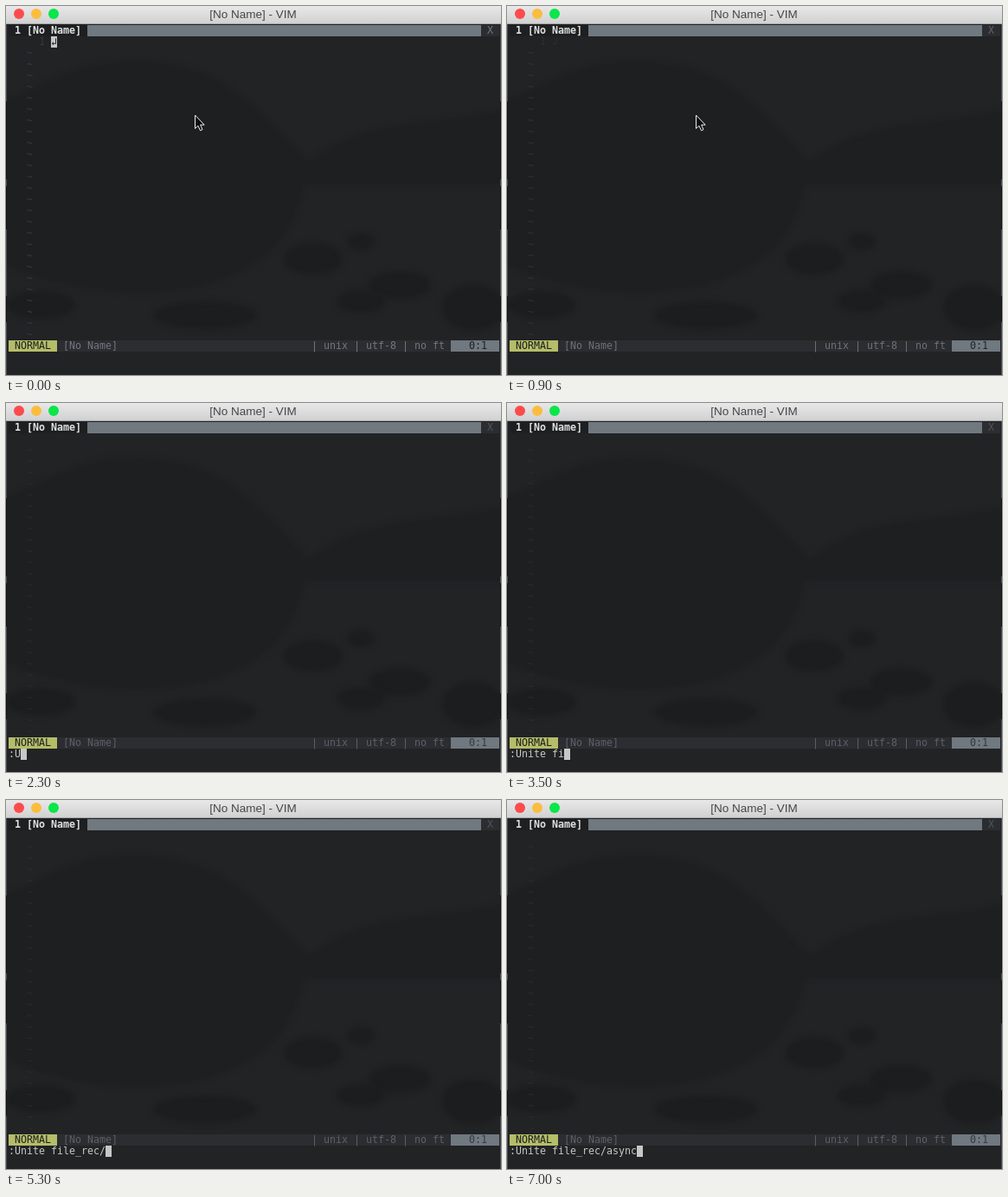
An HTML page with a canvas that plays this animation: 572 by 426 pixels, repeating every 8 s.

```html
<!DOCTYPE html>
<html lang="en">
<head>
<meta charset="utf-8">
<title>Vim command line</title>
<style>
  html, body { margin: 0; width: 100%; height: 100%; overflow: hidden; background: #1f2123; }
  canvas { display: block; }
</style>
</head>
<body>
<canvas id="stage" width="572" height="426"></canvas>
<script>
const W = 572, H = 426, LOOP = 8000;
const CELL = 7, ROW = 13, LEFT = 3, TOP = 22;
const MONO = '11.63px "DejaVu Sans Mono", monospace';
const GRAY = '#707880', LIGHT = '#c5c8c6', DARK = '#1d1f21', FAINT = '#373b41';

const command = 'Unite file_rec/async';
const keyTimes = [2300, 2500, 2600, 2800, 2900, 3200, 3400, 3500, 3700, 3800,
                  4500, 4700, 4800, 5100, 5300, 6200, 6400, 6500, 6700, 6800];
const PROMPT = 1900;

const ctx = document.getElementById('stage').getContext('2d');
const between = (t, from, to) => t >= from && t < to;

function rect(c, color, x, y, w, h) {
  c.fillStyle = color;
  c.fillRect(x, y, w, h);
}

function cells(color, col, row, count) {
  rect(ctx, color, LEFT + col * CELL, TOP + row * ROW, count * CELL, ROW);
}

function text(str, col, row, color, bold = false) {
  ctx.font = (bold ? 'bold ' : '') + MONO;
  ctx.textAlign = 'left';
  ctx.fillStyle = color;
  ctx.fillText(str, LEFT + col * CELL, TOP + row * ROW + 10);
}

function withAlpha(alpha, draw) {
  ctx.globalAlpha = alpha;
  draw();
  ctx.globalAlpha = 1;
}

// Dim landscape behind the translucent window, plus the title bar.
function makeBackdrop() {
  const canvas = document.createElement('canvas');
  canvas.width = W;
  canvas.height = H;
  const c = canvas.getContext('2d');
  rect(c, '#212325', 0, 0, W, H);

  c.filter = 'blur(3px)';
  c.fillStyle = '#1e1f20';
  c.fill(new Path2D('M-9 110C40 100 70 64 140 64C250 60 290 120 350 180' +
    'C420 125 500 140 581 118V206H345C330 270 300 300 230 322C150 340 70 330 -9 296Z'));
  c.fillStyle = '#1c1d1e';
  for (const [x, y, rx, ry] of [[355, 292, 34, 18], [455, 322, 36, 16], [410, 272, 16, 10],
       [540, 348, 36, 26], [40, 345, 40, 16], [410, 341, 28, 13], [230, 357, 60, 16]]) {
    c.beginPath();
    c.ellipse(x, y, rx, ry, 0, 0, 7);
    c.fill();
  }
  c.filter = 'none';

  for (const x of [0, W - 1]) {
    rect(c, '#4a4b50', x, 21, 1, H);
    rect(c, '#1b1214', x, 110, 1, 90);
    rect(c, '#151314', x, 208, 1, 50);
    rect(c, '#151314', x, 335, 1, 30);
  }

  const bar = c.createLinearGradient(0, 0, 0, 20);
  bar.addColorStop(0, '#e9e8e9');
  bar.addColorStop(1, '#d2d1d2');
  rect(c, bar, 0, 0, W, 20);
  rect(c, '#aaa9aa', 0, 20, W, 1);
  ['#fc4b4c', '#fbbd3f', '#0be64a'].forEach((color, i) => {
    c.fillStyle = color;
    c.beginPath();
    c.arc(15 + 20 * i, 9, 6, 0, 7);
    c.fill();
  });
  c.font = '13.5px "Liberation Sans", Arial, sans-serif';
  c.textAlign = 'center';
  c.fillStyle = '#474647';
  c.fillText('[No Name] - VIM', 285.5, 14);
  return canvas;
}

function drawTabs(fade) {
  cells(DARK, 0, 0, 13);
  text('1 [No Name]', 1, 0, '#e0e2e0', true);
  cells(GRAY, 13, 0, 65);
  cells('#2b2d30', 78, 0, 3);
  withAlpha(1 - 0.45 * fade, () => text('X', 79, 0, GRAY));
}

function drawBuffer(t, fade) {
  withAlpha(1 - 0.55 * fade, () => {
    for (let row = 2; row <= 27; row++) text('~', 3, row, FAINT);
  });
  withAlpha(1 - fade, () => {
    text('1', 5, 1, FAINT);
    text('↲', 7, 1, FAINT);
  });
  const cursorOn = t < 200 || between(t, 500, 900) || between(t, 1100, 1400) || between(t, 1700, PROMPT);
  if (cursorOn) {
    cells(LIGHT, 7, 1, 1);
    text('↲', 7, 1, DARK);
  }
}

function drawStatus(fade) {
  cells('#2b2d30', 0, 28, 81);
  cells('#b5bd68', 0, 28, 8);
  text('NORMAL', 1, 28, DARK);
  cells(GRAY, 73, 28, 8);
  withAlpha(1 - 0.3 * fade * fade, () => {
    text('[No Name]', 9, 28, GRAY);
    text('| unix | utf-8 | no ft', 50, 28, GRAY);
    text('0:1', 76, 28, DARK);
  });
}

function drawCommand(t) {
  if (t < PROMPT) return;
  const typed = ':' + command.slice(0, keyTimes.filter(k => k <= t).length);
  text(typed, 0, 29, LIGHT);
  if (!between(t, 6000, 6200)) cells(LIGHT, typed.length, 29, 1);
}

const arrow = new Path2D('M218.5 126V141.5L222 138.3L224.5 143.8L227 142.6L224.6 137.2H229.2Z');

function drawPointer() {
  ctx.fillStyle = '#0c0c0c';
  ctx.fill(arrow);
  ctx.strokeStyle = '#eee';
  ctx.lineWidth = 1;
  ctx.stroke(arrow);
}

const backdrop = makeBackdrop();

function frame() {
  const t = Math.floor(performance.now() % LOOP / 100) * 100;
  const fade = Math.min(1, Math.max(0, (t - 400) / 1000));
  ctx.drawImage(backdrop, 0, 0);
  drawTabs(fade);
  drawBuffer(t, fade);
  drawStatus(fade);
  drawCommand(t);
  if (t < PROMPT) drawPointer();
  requestAnimationFrame(frame);
}
frame();
</script>
</body>
</html>
```
